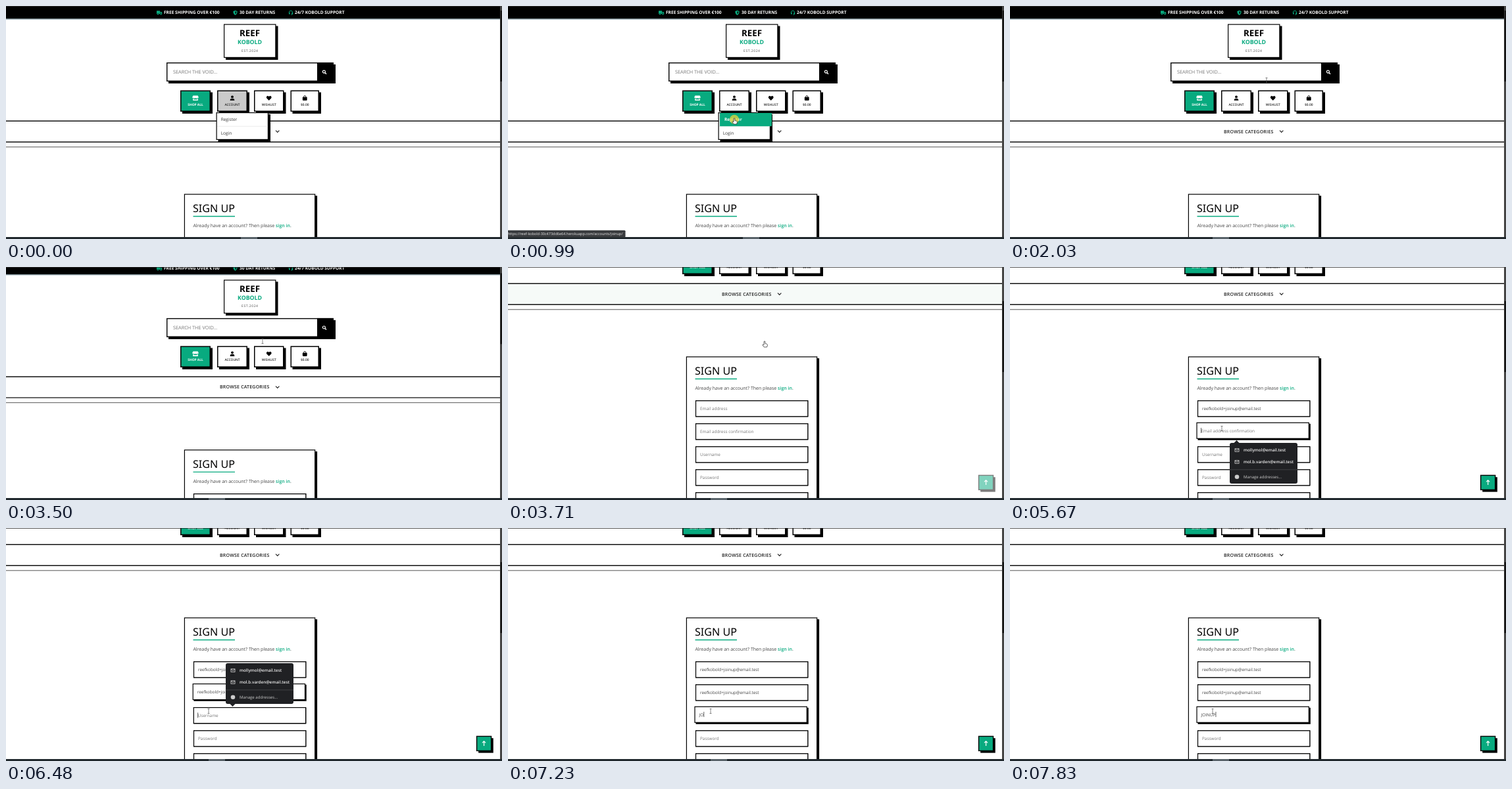
Write an HTML page that moves like this. It is 754 by 355 pixels and loops after 8000 ms.

```html
<!DOCTYPE html>
<html lang="en">
<head>
<meta charset="utf-8">
<title>Sign up walkthrough</title>
<style>
html, body { margin: 0; width: 100%; height: 100%; overflow: hidden; background: #fff; }
svg { display: block; width: 754px; height: 355px; }
text { font-family: "Open Sans", "Noto Sans", sans-serif; text-rendering: geometricPrecision; white-space: pre; }
</style>
</head>
<body>
<svg id="stage" xmlns="http://www.w3.org/2000/svg" viewBox="0 0 754 355"></svg>
<script>
const LOOP = 8000;
const GREEN = '#08aa7f';
const MAIL = 'reefkobold+joinup@email.test';
const USER = 'JOINUP';
const KEY_TIMES = [6960, 7225, 7360, 7490, 7690, 7820];
const LABELS = ['Email address', 'Email address confirmation', 'Username', 'Password', 'Password (again)'];
const FOCUS = [[4300, 5480], [5480, 6460], [6460, 9000]];
// y, tip direction, fade in start/end, fade out start/end
const POPUPS = [
  [233, -1, 4390, 4460, 4900, 5050],
  [268, -1, 5560, 5650, 6095, 6200],
  [206, 1, 6440, 6475, 6965, 7040]
];
const PATH = [
  [70, 355, 150], [820, 344, 171], [1700, 344, 171], [2010, 390, 113], [3780, 390, 113],
  [4170, 336, 210], [5140, 336, 210], [5450, 322, 246], [6140, 322, 246], [6400, 308, 279]
];
const SHAPES = [[0, ''], [70, 'hand'], [1950, 'beam'], [3620, 'hand'], [3800, 'arrow'], [4130, 'beam']];

// markup helpers
const rect = (x, y, w, h, fill, more = '') =>
  `<rect x="${x}" y="${y}" width="${w}" height="${h}" fill="${fill}" ${more}/>`;
const text = (x, y, size, str, fill = '#222', weight = 400, more = '') =>
  `<text x="${x}" y="${y}" font-size="${size}" fill="${fill}" font-weight="${weight}" ${more}>${str}</text>`;
const mid = 'text-anchor="middle"';
const path = (d, fill = 'none', more = '') => `<path d="${d}" fill="${fill}" ${more}/>`;
const line = (d, color, width = 1) => path(d, 'none', `stroke="${color}" stroke-width="${width}"`);
const at = (x, y, body, id = '') => `<g ${id && `id="${id}"`} transform="translate(${x} ${y})">${body}</g>`;
const box = (x, y, w, h, fill = '#fff', border = 1.4, shadow = 3, id = '') =>
  rect(x + shadow, y + shadow, w, h, '#000') +
  rect(x + border / 2, y + border / 2, w - border, h - border, fill,
    `stroke="#000" stroke-width="${border}" ${id && `id="${id}"`}`);

const icons = {
  truck: path('M-4-3H1V2H-4ZM1.5-1.5H3L4.3 .2V2H1.5Z', GREEN) +
    `<g fill="${GREEN}" stroke="#000" stroke-width=".5"><circle cx="-2" cy="2.2" r="1.2"/><circle cx="2.6" cy="2.2" r="1.2"/></g>`,
  shield: path('M0-3.6L3.1-2.4Q3.2 2 0 3.6Q-3.2 2-3.1-2.4Z', GREEN) + path('M0-2.2V2.2Q1.8 1 1.9-1.5Z', '#000'),
  headset: line('M-2.7 .5V-.4A2.7 2.7 0 0 1 2.7-.4V1.6Q2.6 3 .4 3', GREEN, .9) +
    rect(-3, -.2, 1.7, 2.4, GREEN) + rect(1.3, -.2, 1.7, 2.4, GREEN),
  store: path('M-3.6-3.8H3.6L4.8-1.2Q4.4 .4 3.2 0Q1.6 .8 0 0Q-1.6 .8-3.2 0Q-4.4 .4-4.8-1.2Z', '#fff') +
    path('M-3.8 .9H-2.6V2.1H2.6V.9H3.8V3.8H-3.8Z', '#fff'),
  user: '<circle cy="-1.9" r="1.9"/>' + path('M-3.3 3.7Q-3.3 .6-1 .6H1Q3.3 .6 3.3 3.7Z', '#000'),
  heart: path('M0 3.6L-3.4 .2C-5-2.2-1.8-4.6 0-2.2C1.8-4.6 5-2.2 3.4 .2Z', '#000'),
  bag: path('M-3.4-1.5H3.4V2.6Q3.4 3.7 2.3 3.7H-2.3Q-3.4 3.7-3.4 2.6Z', '#000') +
    line('M-1.6-.6V-2A1.6 1.6 0 0 1 1.6-2V-.6', '#000', .9),
  search: '<circle cx="-.6" cy="-.6" r="2" fill="none" stroke="#fff" stroke-width="1.2"/>' + line('M.8 .8L3 3', '#fff', 1.4),
  mail: rect(-3, -2.2, 6, 4.4, 'none', 'stroke="#ddd" stroke-width=".8"') + line('M-3-2L0 .4L3-2', '#ddd', .8)
};

const topItem = (icon, ix, x, str) => at(ix, 10.3, icons[icon]) + text(x, 12.3, 6.6, str, '#fff', 700);

const navButton = (x, w, icon, str, fill, color, weight, id) =>
  box(x, 128.5, w, 32.5, fill, 1.5, 3, id) + at(x + w / 2, 140.3, icons[icon]) +
  text(x + w / 2, 151.6, 4.9, str, color, weight, mid);

function header() {
  return rect(0, 0, 751, 19.5, '#000') + rect(0, 19.5, 751, 1, '#6f8a96') +
    topItem('truck', 233, 240, 'FREE SHIPPING OVER €100') +
    topItem('shield', 348.5, 355, '30 DAY RETURNS') +
    topItem('headset', 433, 439, '24/7 KOBOLD SUPPORT') +
    box(331, 27.5, 79.5, 51.5, '#fff', 1.2) +
    text(370.5, 46.3, 13.3, 'REEF', '#000', 700, mid) +
    text(370.5, 58.4, 8.8, 'KOBOLD', GREEN, 700, mid) +
    text(370.8, 69.6, 5, 'EST.2024', '#444', 400, mid + ' letter-spacing=".6"') +
    box(244, 86, 254, 29) + rect(473, 86, 25, 29, '#000') + at(484, 100.7, icons.search) +
    text(254, 103.3, 7.3, 'SEARCH THE VOID...', '#777') +
    navButton(265, 46, 'store', 'SHOP ALL', GREEN, '#fff', 700, 'shop') +
    navButton(321, 46, 'user', 'ACCOUNT', '#fff', '#222', 600, 'account') +
    navButton(377, 45.5, 'heart', 'WISHLIST', '#fff', '#222', 600, 'wish') +
    navButton(432.5, 43.5, 'bag', '$0.00', '#fff', '#222', 600, 'cart') +
    rect(0, 175, 751, 32, '#f6faf8', 'id="band" opacity="0"') +
    line('M0 175.3H751M0 207.2H751', '#111', 1.4) + line('M0 214.8H751', '#555', 1) +
    text(325, 193.6, 7, 'BROWSE CATEGORIES', '#222', 600, 'letter-spacing=".2"') +
    line('M410 189.7L412.7 192.4L415.4 189.7', '#222', 1.2);
}

function menu() {
  return `<g id="menu">` + box(319.5, 162, 79.5, 42, '#fff', 1.2) + line('M321 183.3H398', '#e4e4e4', .7) +
    text(326.7, 175.4, 6.5, 'Register', '#333') + text(326.7, 195.7, 6.5, 'Login', '#333') +
    `<g id="hover">` + rect(322, 163, 79, 20.2, GREEN) + text(329, 175.4, 6.5, 'Register', '#fff', 700) + `</g></g>`;
}

const field = (label, i) => `<g id="field${i}">` +
  rect(285, 353.3, 171.3, 25, '#000', `id="shade${i}"`) +
  rect(285.5, 353.8, 170.3, 24, '#fff', 'stroke="#000" stroke-width="1.2"') +
  text(292, 368, 6.4, label, '#777', 400, `id="value${i}"`) +
  rect(292, 361.5, .7, 8, '#222', `id="caret${i}" opacity="0"`) + '</g>';

function card() {
  return box(270.8, 286.3, 199.5, 340, '#fff', 1.2, 2.8) +
    text(284, 313.8, 16.1, 'SIGN UP', '#000', 400, `style="font-family:'Noto Sans',sans-serif"`) +
    line('M284.5 320.5H348', GREEN, 1.4) +
    text(284.4, 337.2, 7,
      `Already have an account? Then please <tspan fill="${GREEN}" font-weight="600">sign in</tspan>.`, '#444') +
    LABELS.map(field).join('');
}

const popup = ([y, dir], i) => {
  const base = dir < 0 ? 1 : 61;
  const row = (dy, str) => at(11, dy, icons.mail) + text(21, dy + 2.3, 6.3, str, '#eee', 600);
  return at(334, y, rect(0, 0, 103, 62, '#202124', 'rx="3"') +
    path(`M5.5 ${base}L10.5 ${base + dir * 5}L15.5 ${base}Z`, '#202124') +
    row(11, 'mollymol@email.test') + row(29, 'mol.b.varden@email.test') +
    line('M0 40.8H103', '#484a4d', .8) + '<circle cx="11" cy="51.8" r="3.3" fill="#ccc"/>' +
    text(21, 54, 6.1, 'Manage addresses...', '#ccc'), 'popup' + i);
};

function overlay() {
  return `<g id="toTop">` + rect(718.2, 320.2, 22.6, 22.4, '#000') +
    rect(715.6, 317.4, 22, 22, GREEN, 'stroke="#000" stroke-width="1.4"') +
    line('M726.6 332V325M724 327.4L726.6 324.8L729.2 327.4', '#fff', 1.2) + '</g>' +
    POPUPS.map(popup).join('') +
    rect(0, 0, 754, .8, '#333') + rect(751, 0, 3, 355, '#444') + rect(751.6, 7, 2.4, 108, '#151515', 'id="thumb"') +
    rect(0, 352, 754, 3, '#20282d') + rect(357, 352, 25, 3, '#59636a', 'id="task"') +
    `<g id="status">` + rect(-2, 341.8, 180.5, 10.6, '#3a3c3f', 'rx="1.5"') +
    text(174.5, 349, 5.5, 'https://reef-kobold-30c473dd6e64.herokuapp.com/accounts/joinup/', '#e6e6e6', 400, 'text-anchor="end"') + '</g>' +
    `<circle id="ring" cx="344" cy="172.8" r="7" fill="#e8d43c" opacity="0"/>` +
    at(0, 0,
      path('M-.9 .5Q0-.6 .9 .5V3.6L3.6 4.3Q4.6 4.8 4.4 6L3.6 9H-.8L-3.2 5.6Q-2.6 4.4-.9 5.6Z', '#fff', 'id="hand" stroke="#222" stroke-width=".7"') +
      path('M-1.5-3.5H1.5M0-3.5V3.5M-1.5 3.5H1.5', 'none', 'id="beam" stroke="#555" stroke-width=".7"') +
      path('M0 0V8L2 6.2L3.3 9L4.5 8.4L3.3 5.8H6Z', '#fff', 'id="arrow" stroke="#222" stroke-width=".6"'), 'cursor');
}

const stage = document.getElementById('stage');
stage.innerHTML = rect(0, 0, 754, 355, '#fff') + `<g id="page">${header()}${card()}${menu()}</g>` + overlay();

const el = {};
stage.querySelectorAll('[id]').forEach(n => el[n.id] = n);

const ramp = (t, a, b) => Math.min(1, Math.max(0, (t - a) / (b - a)));
const smooth = k => k * k * (3 - 2 * k);
const pulse = (t, a, b, c, d) => ramp(t, a, b) - ramp(t, c, d);
const set = (id, name, value) => el[id].setAttribute(name, value);
const fade = (id, k) => set(id, 'opacity', k);
const move = (id, x, y) => set(id, 'transform', `translate(${x} ${y})`);

function cursorAt(t) {
  let i = 0;
  while (i < PATH.length - 2 && t > PATH[i + 1][0]) i++;
  const [a, x, y] = PATH[i], [b, u, v] = PATH[i + 1];
  const k = smooth(ramp(t, a, b));
  return [x + (u - x) * k, y + (v - y) * k];
}

function valueAt(i, t) {
  if (i === 0) return t >= 4860 ? MAIL : '';
  if (i === 1) return t >= 6095 ? MAIL : '';
  return USER.slice(0, KEY_TIMES.filter(k => t >= k).length);
}

function drawField(i, t) {
  const [on, off] = FOCUS[i];
  const k = pulse(t, on, on + 140, off, off + 140);
  const str = valueAt(i, t), label = el['value' + i];
  if (label.textContent !== (str || LABELS[i])) label.textContent = str || LABELS[i];
  set('value' + i, 'fill', str ? '#444' : '#777');
  move('field' + i, -1.5 * k, 35 * i - 1.5 * k);
  move('shade' + i, 2 * k, 2 * k);
  fade('caret' + i, t >= on && t < off ? 1 : 0);
  set('caret' + i, 'x', 292 + (str ? label.getComputedTextLength() + .3 : -.4));
}

function draw(t) {
  const scroll = smooth(ramp(t, 3470, 3690));
  move('page', 0, -150 * scroll);
  set('thumb', 'y', 7 + 45 * scroll);
  fade('band', pulse(t, 3540, 3640, 3710, 3900));
  fade('toTop', ramp(t, 3620, 3800));

  const grey = Math.round(255 - 53 * (1 - ramp(t, 200, 420)));
  set('account', 'fill', `rgb(${grey},${grey},${grey})`);
  fade('menu', t < 1800 ? 1 : 0);
  fade('hover', ramp(t, 620, 760));
  fade('status', pulse(t, 880, 900, 1900, 1990));
  fade('ring', .75 * pulse(t, 950, 985, 1050, 1300));
  set('task', 'x', t < 1630 ? 357 : 308);

  FOCUS.forEach((_, i) => drawField(i, t));
  [3, 4].forEach(i => move('field' + i, 0, 35 * i));
  POPUPS.forEach((p, i) => fade('popup' + i, pulse(t, ...p.slice(2))));

  const shape = SHAPES.filter(s => t >= s[0]).pop()[1];
  ['hand', 'beam', 'arrow'].forEach(s => fade(s, s === shape ? 1 : 0));
  move('cursor', ...cursorAt(t));
}

const start = performance.now();
function tick() {
  draw((performance.now() - start) % LOOP);
  requestAnimationFrame(tick);
}
tick();
</script>
</body>
</html>
```
